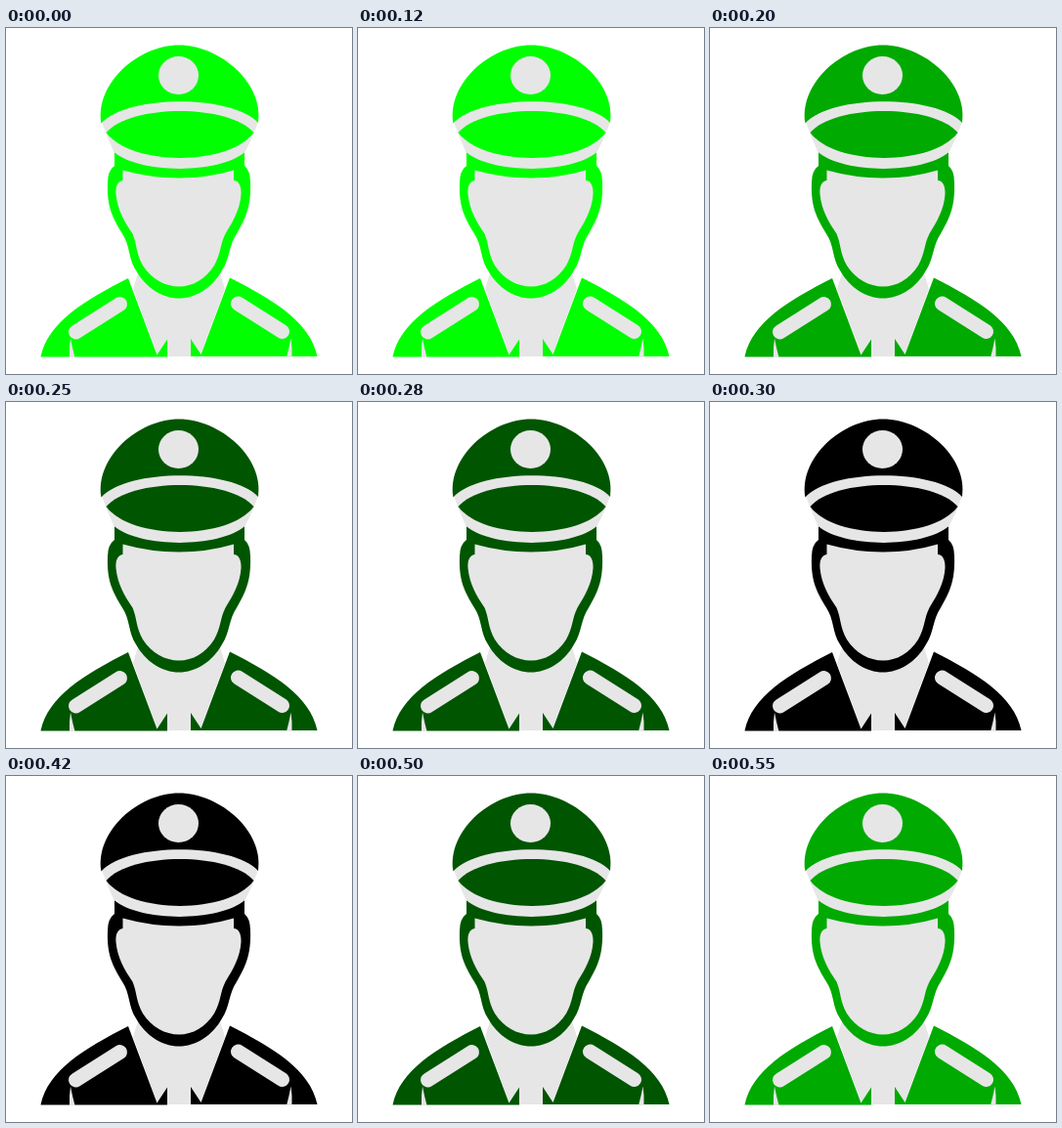
Write an HTML page that moves like this. It is 354 by 354 pixels and loops after 0.6 s.

```html
<!DOCTYPE html>
<html lang="en">
<head>
<meta charset="utf-8">
<title>Blinking officer</title>
<style>
  html, body { margin: 0; width: 100%; height: 100%; overflow: hidden; background: #fff; }
  svg { display: block; width: 100%; height: 100%; }
  .pale { fill: #e6e6e6; }
  .strap { stroke: #e6e6e6; stroke-width: 15; stroke-linecap: round; }
</style>
</head>
<body>
<svg id="officer" viewBox="0 0 354 354" fill="currentColor" color="#0f0">
  <!-- shirt and tie -->
  <path class="pale" d="M137 244L130 267L155 334L165 319V336H189V319L199 334L224 267L217 244Z"/>

  <!-- one side of the jacket, mirrored for the other -->
  <g id="side">
    <path d="M35.500 336.500C43 301 80 279 125 256L154.500 334.500L165 318.500V336.500Z"/>
    <path class="strap" d="M71.500 311L116.500 282.500"/>
  </g>
  <use href="#side" transform="translate(354 -.5) scale(-1 1)"/>
  <path class="pale" d="M66 317.500Q68 328 70.500 337H65Q64.500 327 66 317.500Z"/>
  <path class="pale" d="M291.500 317.500Q289.500 328 287 337H292.500Q293 327 291.500 317.500Z"/>

  <!-- head -->
  <path d="M111 122V141Q104 146 104 158C103 183 109 194 119 210.500C127 222 125 236 133 248C143 266 160 276.500 177 276.500S211 266 221 248C229 236 228 222 236 210.500C245 195 251 183 250 158Q250 146 244 141V122Z"/>
  <path class="pale" d="M119.500 145.500Q148 153.500 177 153.500T233 145.500V156C238 156 241 162 240.500 170C239.500 186 232 198 224.500 210.500C219 221 220 231 213 243C204 257 191 264.500 177 264.500S149 257 140 243C133 231 134 221 129.500 210.500C121 198 114 186 112.500 170C112 162 114 157 119.500 156Z"/>

  <!-- cap -->
  <path class="pale" d="M98 96L104 112L110.500 127C138 149.500 217 149.500 244.500 127L252 112L258 96C230 60 124 60 98 96Z"/>
  <path d="M97.500 97.500C91 57 135 17.500 177 17.500S264.500 57 258 97C231 68 124 68 97.500 97.500Z"/>
  <path d="M102.500 107C127 77.500 229 77.500 253.500 107C228 141.500 128 141.500 102.500 107Z"/>
  <ellipse class="pale" cx="176.500" cy="48.500" rx="20.500" ry="19.500"/>
</svg>
<script>
  const officer = document.getElementById("officer");
  const loop = 600;
  // [start in ms, green level]
  const steps = [[0, 255], [200, 170], [250, 85], [300, 0], [500, 85], [550, 170]];

  function draw() {
    const t = performance.now() % loop;
    const [, green] = steps.findLast(([start]) => t >= start);
    officer.style.color = `rgb(0, ${green}, 0)`;
    requestAnimationFrame(draw);
  }
  draw();
</script>
</body>
</html>
```
